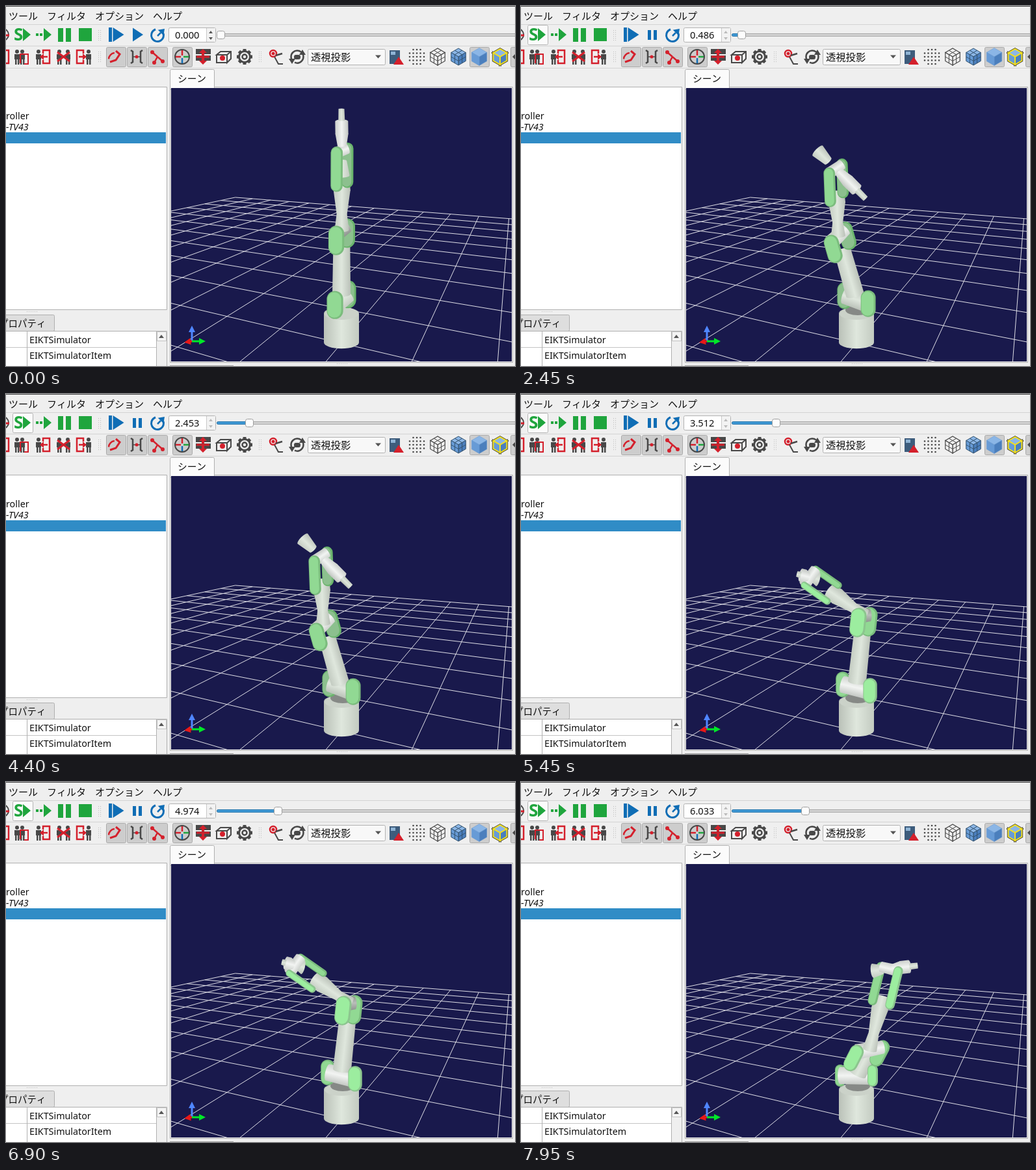
An HTML page with a canvas for the animation above (8000 ms loop, 783 by 553 pixels).

```html
<!DOCTYPE html>
<html lang="ja">
<meta charset="utf-8">
<title>Robot simulator</title>
<style>
html, body { margin: 0; width: 783px; height: 553px; overflow: hidden; background: #efefef }
canvas { display: block }
</style>
<canvas id="stage" width="783" height="553"></canvas>
<script>
const g = document.getElementById('stage').getContext('2d');
const FONT = '"Noto Sans", "Noto Sans CJK JP", sans-serif';
const RED = '#d4202c', DARK = '#484848', GREEN = '#1fa53d', BLUE = '#0f6db5', EDGE = '#b0b0b0';
const { PI, cos, sin, hypot, sqrt, max } = Math;

// ---- drawing helpers ----
function rect(c, x, y, w, h) { g.fillStyle = c; g.fillRect(x, y, w, h); }
function trace(p) {
  g.beginPath();
  for (let i = 0; i < p.length; i += 2) g.lineTo(p[i], p[i + 1]);
}
function poly(c, ...p) { trace(p); g.fillStyle = c; g.fill(); }
function line(c, w, ...p) { trace(p); g.strokeStyle = c; g.lineWidth = w; g.stroke(); }
function oval(c, x, y, rx, ry = rx) {
  g.beginPath(); g.ellipse(x, y, rx, ry, 0, 0, 7);
  g.fillStyle = c; g.fill();
}
function arc(c, w, x, y, r, a = 0, b = 2 * PI) {
  g.beginPath(); g.arc(x, y, r, a, b);
  g.strokeStyle = c; g.lineWidth = w; g.stroke();
}
function box(fill, edge, x, y, w, h, r = 2) {
  g.beginPath(); g.roundRect(x + .5, y + .5, w - 1, h - 1, r);
  g.fillStyle = fill; g.fill();
  g.strokeStyle = edge; g.lineWidth = 1; g.stroke();
}
function text(s, x, y, size = 14.5, style = '', c = '#111') {
  g.font = `${style} ${size}px ${FONT}`;
  g.fillStyle = c;
  g.fillText(s, x, y);
}
function dots(x, y, nx, ny) {
  for (let i = 0; i < nx; i++) for (let j = 0; j < ny; j++) rect('#bcbcbc', x + i * 3, y + j * 3, 1, 1);
}
// Triangle centred on (x, y); (dx, dy) reaches its tip, w is half its base.
function tri(c, x, y, dx, dy, w) {
  const k = w / hypot(dx, dy);
  poly(c, x + dx, y + dy, x - dx - dy * k, y - dy + dx * k, x - dx + dy * k, y - dy - dx * k);
}

// ---- floor grid: pinhole camera ----
const YAW = 24 * PI / 180, PITCH = 12.9 * PI / 180, DIST = 2.39, HEIGHT = 1.39, FOCAL = 585, NEAR = .1;
function toCamera(x, y) {
  const f = DIST - x * cos(YAW) - y * sin(YAW);
  return [y * cos(YAW) - x * sin(YAW), HEIGHT * cos(PITCH) - f * sin(PITCH), f * cos(PITCH) + HEIGHT * sin(PITCH)];
}
function floorLine(a, b) {
  if (a[2] < b[2]) [a, b] = [b, a];
  if (b[2] < NEAR) {
    const k = (a[2] - NEAR) / (a[2] - b[2]);
    b = a.map((v, i) => v + (b[i] - v) * k);
  }
  if (a[2] > NEAR) line('#dedee6', 1, ...[a, b].flatMap(([x, y, z]) => [516 + FOCAL * x / z, 336 + FOCAL * y / z]));
}
function grid() {
  for (let k = -5; k <= 5; k += .5) {
    floorLine(toCamera(k, -5), toCamera(k, 5));
    floorLine(toCamera(-5, k), toCamera(5, k));
  }
}

// ---- robot: joints on screen, hinges turned by angle about their link ----
const SHELL = ['#c3cbc1', '#dfe7dd', '#bac1b8'], BRIGHT = ['#ccd0cc', '#f2f4f2', '#c2c6c2'];
const GREY = ['#8c908c', '#b9bdb9', '#8a8e8a'];
const SHOULDER = [516, 451];
const poses = [
  { elbow: [516.5, 344], wrist: [517, 222], tool: [-1, -64], turn: [1.98, 1.98, 2.15], light: 0 },
  { elbow: [488, 353], wrist: [484, 250], tool: [46, 46], turn: [.76, 2.24, 2.3], light: 0 },
  { elbow: [528, 340], wrist: [444.5, 281.5], tool: [-20, -5], turn: [.57, 1.98, PI], light: 1 },
  { elbow: [536.5, 411], wrist: [567, 287], tool: [43, -5], turn: [0, 2.45, .4], light: 1 }
];
const along = (p, v, k) => [p[0] + v[0] * k, p[1] + v[1] * k];
const between = (a, b) => [b[0] - a[0], b[1] - a[1]];

function tube([x1, y1], r1, [x2, y2], r2, tone = SHELL, round = .3) {
  const n = hypot(x2 - x1, y2 - y1), r = max(r1, r2), q = PI / 2;
  g.save();
  g.translate(x1, y1);
  g.rotate(Math.atan2(y2 - y1, x2 - x1));
  const shade = g.createLinearGradient(0, -r, 0, r);
  tone.forEach((c, i) => shade.addColorStop(i / 2, c));
  g.beginPath();
  g.ellipse(n, 0, r2 * round, r2, 0, -q, q);
  g.ellipse(0, 0, r1 * round, r1, 0, q, 3 * q);
  g.closePath();
  g.fillStyle = shade;
  g.fill();
  g.restore();
}
function pad(a, b, r, light) {
  g.lineCap = 'round';
  line(`hsl(122 33% ${61 + light * 5}%)`, 2 * r, ...a, ...b);
  line(`hsl(122 ${49 + light * 20}% ${71 + light * 6}%)`, 2 * r - 4, a[0] - 1, a[1], b[0] - 1, b[1]);
  g.lineCap = 'butt';
}
// Half of a hinge axle: sideways across the link, and tipped when the link is foreshortened.
function axle(link, full, reach, turn) {
  const n = hypot(...link), tip = sqrt(max(0, 1 - (n / full) ** 2)) * sin(turn);
  return [(link[1] * cos(turn) + link[0] * tip) * reach / n, (link[1] * tip - link[0] * cos(turn)) * reach / n];
}
// Far pad, whatever sits between, near pad.
function hinge(joint, axis, span, r, light, middle) {
  const near = along(joint, axis, 1), far = along(joint, axis, -1);
  pad(far, along(far, span, 1), r, light - 1);
  middle(far, near);
  pad(near, along(near, span, 1), r, light);
}
function robot({ elbow, wrist, tool, turn, light }) {
  const arm = between(elbow, SHOULDER), forearm = between(wrist, elbow);
  const thick = (thin, extra, i) => thin + extra * sin(turn[i]);
  const onForearm = k => along(elbow, forearm, -k), onTool = k => along(wrist, tool, k);

  tube([516, 472], 27, [516, 517], 27, SHELL, .34);
  oval('#cbd2c9', 516, 473, 26, 9);
  if (turn[0] < 1) oval('#868986', 518, 467, 19, 8);
  hinge([SHOULDER[0], SHOULDER[1] - 9], [25 * cos(turn[0]), 9 * sin(turn[0])], [0, 18], thick(8, 5, 0), light, (far, near) => {
    tube(along(far, [0, 9], 1), 13, along(near, [0, 9], 1), 14, light ? BRIGHT : SHELL);
    tube(along(SHOULDER, arm, -.08), 14, along(elbow, arm, .24), 13);
  });
  hinge(elbow, axle(arm, 112, 21, turn[1]), along([0, 0], arm, 21 / hypot(...arm)), thick(8, 4.5, 1), light, (far, near) => {
    tube(far, 10, near, 12, turn[1] < 2 ? GREY : BRIGHT);
    tube(onForearm(0), 11, onForearm(.2), 8);
    tube(onForearm(.2), 8, onForearm(.5), 13);
    tube(onForearm(.5), 13, onForearm(.64), 12);
  });
  hinge(wrist, axle(forearm, 126, 15, turn[2]), along([0, 0], forearm, .42), thick(5.5, 4.5, 2), light, (far, near) => {
    tube(onTool(-.25), 7, onTool(-.6), 11);
    tube(far, 8, near, 9, BRIGHT);
    tube(onTool(.12), 7, onTool(.4), 10, BRIGHT);
    tube(onTool(.4), 10, onTool(.7), 10, BRIGHT);
    tube(onTool(.72), 5, onTool(1), 4.5, SHELL, .1);
  });
}

// ---- icons, all centred on the toolbar line ----
const MID = 78;
function person(x) {
  oval(DARK, x, MID - 8, 3);
  rect(DARK, x - 4, MID - 4, 8, 8);
  for (const dx of [-3, 1]) rect(DARK, x + dx, MID + 4, 2.5, 8);
}
function arrow(c, x, d) {
  line(c, 2.5, x, MID, x + d * 8, MID);
  tri(c, x + d * 9, MID, d * 3, 0, 5);
}
function bracket(x, d) {
  line(RED, 2.5, x, MID - 5, x, MID - 10, x + d * 10, MID - 10, x + d * 10, MID + 10, x, MID + 10, x, MID + 5);
}
const toggle = x => box('#cdcdcd', '#a9a9a9', x - 15, 63, 31, 31);
// Isometric cube: three rhombic faces of a hexagon, optionally meshed.
function cube(x, r, faces, edge, w, mesh) {
  const c = [x, MID], v = k => [x + r * sin(k * PI / 3), MID - r * cos(k * PI / 3)];
  const half = (a, b) => along(a, between(a, b), .5);
  faces.forEach((face, i) => {
    const [a, b, d] = [2 * i - 1, 2 * i, 2 * i + 1].map(v);
    poly(face, ...c, ...a, ...b, ...d);
    line(edge, w, ...c, ...a, ...b, ...d, ...c);
    if (mesh) {
      line(edge, 1, ...half(a, b), ...half(c, d));
      line(edge, 1, ...half(b, d), ...half(c, a));
    }
  });
}

function playbackBar(t, sim) {
  const running = t >= 1950, y = 44;
  arc(DARK, 2, -5, y, 9);
  line(RED, 3, 0, y + 1, 5, y + 1);
  if (t >= 700) box(t >= 1900 && !running ? '#d4d4d4' : '#fbfbfb', '#b4b4b4', 10, 29, 32, 31);
  text('S', 12, 53, 26, 'bold', GREEN);
  for (const x of [32, 64]) tri(GREEN, x, y, 6, 0, 10);
  for (const x of [46, 52]) rect(GREEN, x, y - 2, 4, 4);
  for (const x of [80, 92]) rect(GREEN, x, 34, 8, 21);
  rect(GREEN, 112, 34, 20, 20);
  dots(142, 37, 2, 6);
  rect(BLUE, 158, 33, 5, 22);
  tri(BLUE, 173, y, 8.5, 0, 11);
  if (running) for (const x of [195, 204]) rect(BLUE, x, 37, 5, 15);
  else tri(BLUE, 203, y, 8, 0, 10.5);
  arc(BLUE, 3, 233, 45, 9.5, -.5, 4.4);
  tri(BLUE, 241, 38, 3, -3, 6);
  line(BLUE, 2.5, 233, 46, 238, 41);

  box('#fff', '#b2b2b2', 250, 33, 73, 23);
  rect('#f3f3f3', 309, 34, 13, 21);
  rect('#c8c8c8', 308, 34, 1, 21);
  for (const d of [-1, 1]) tri(running ? '#bbb' : '#555', 315, 45 + d * 5, 0, d * 2, 3);
  text(sim.toFixed(3), 260, 50, 14.67);

  const knob = 330.5 + 17.74 * sim;
  box('#d2d2d2', '#a8a8a8', 324, 42, 470, 5);
  if (running) box('#3f98d4', '#2b79ae', 324, 42, knob - 322, 5);
  box('#fdfdfd', '#9d9d9d', Math.round(knob - 6.5), 38, 13, 13, 3);
}

function editBar() {
  bracket(-6, 1);
  [17, 25, 50, 82, 95, 127].forEach(person);
  line(RED, 2, 22, 88, 22, 74, 34, 74, 34, 89, 28, 89);
  bracket(57, 1);
  arrow(RED, 64, -1);
  for (const d of [-1, 1]) line(RED, 3, 79, MID - 7 * d, 98, MID + 7 * d);
  bracket(119, -1);
  arrow(RED, 112, 1);
  dots(142, 70, 2, 6);

  [169, 201, 233, 271, 728, 791].forEach(toggle);
  line(RED, 3, 160, 86, 169, 83, 175, 74, 169, 69);
  arc(RED, 2.5, 168, 82, 10, 3.2, 4.6);
  for (const d of [-1, 1]) {
    line(DARK, 2.5, 201 + 9 * d, 68, 201 + 6 * d, 70, 201 + 6 * d, 86, 201 + 9 * d, 88);
    line(RED, 2.5, 233, 78, 233 + 8 * d, 78 + 7 * d);
    oval(RED, 233 + 8 * d, 78 + 7 * d, 3);
    rect(DARK, 292, 75 + 5 * d - 4, 23, 8);
    line(RED, 4, 303, 78, 303, 78 + 9 * d);
    tri(RED, 303, 78 + 9 * d, 0, 3 * d, 6);
  }
  line(DARK, 1.5, 195, MID, 207, MID);
  oval(RED, 201, MID, 2.5);
  line(RED, 2.5, 233, 78, 228, 87);
  oval(RED, 228, 87, 3);
  arc(DARK, 2, 271, MID, 11);
  ['#1fa53d', BLUE, RED, RED].forEach((c, i) => {
    const dx = cos(i * PI / 2), dy = sin(i * PI / 2);
    line(c, 2.5, 271 + 2 * dx, MID + 2 * dy, 271 + 10 * dx, MID + 10 * dy);
  });
  line(RED, 3, 293, MID, 313, MID);
  line(DARK, 2, 340, 75, 324, 75, 330, 70, 346, 70, 346, 81, 340, 87, 340, 75, 346, 70);
  line(DARK, 2, 324, 75, 324, 87, 340, 87);
  oval(RED, 333, 80, 4);
  for (let a = 0; a < 2 * PI; a += PI / 4)
    line(DARK, 5, 367 + 8 * cos(a), MID + 8 * sin(a), 367 + 12 * cos(a), MID + 12 * sin(a));
  arc(DARK, 3, 367, MID, 8.5);
  arc(DARK, 2.5, 367, MID, 3.5);
  dots(389, 70, 2, 6);

  arc(RED, 2.5, 411, 73, 5);
  oval(RED, 411, 73, 2.5);
  line(DARK, 2.5, 415, 76, 425, 73);
  line(DARK, 2, 413, 78, 419, 89, 426, 89);
  for (const d of [-1, 1]) {
    arc(DARK, 2.5, 448, MID, 9.5, d < 0 ? 2.4 : -.8, d < 0 ? 5.4 : 2);
    tri(DARK, 448 + 8 * d, MID - 7 * d, 0, -4 * d, 5);
  }
  box(DARK, DARK, 443, 75, 10, 7);

  box('#f8f8f8', '#b2b2b2', 464, 66, 120, 25);
  text('透視投影', 469, 84, 15.3);
  tri('#555', 572.5, 78, 0, 2.5, 4.5);
  rect('#3d5c7c', 590, 68, 16, 21);
  rect('#8fb4d5', 592, 70, 7, 5);
  tri(RED, 604, 84, 0, -6, 8);
  for (let i = -2; i <= 2; i++) for (let j = -2; j <= 2; j++)
    if (Math.abs(i * j) < 4) oval(DARK, 632 + i * 5.5, MID + j * 5.5, 1.3);
  const blues = ['#8bb6e6', '#4b7fbd', '#679bd6'];
  cube(664, 13, Array(3).fill('#efefef'), DARK, 1.2, true);
  cube(696, 13, blues, '#34536f', 1, true);
  cube(728, 13.5, blues, '#6597d0', .5);
  cube(760, 12, blues, '#303030', 3.5);
  cube(760, 12, blues, '#f2df20', 2);
  tri(DARK, 781, MID, -2, 0, 4);
}

function panels() {
  rect('#fff', 0, 125, 247, 341);
  line(EDGE, 1, 0, 124.5, 247.5, 124.5, 247.5, 466.5, 0, 466.5);
  text('roller', 0, 174, 14.3);
  text('-TV43', 0, 191, 14.3, 'italic');
  rect('#308cc6', 0, 194, 246, 17);
  dots(32, 469, 6, 1);
  box('#dedede', EDGE, -5, 474, 80, 26);
  text('プロパティ', -11, 493);
  rect('#fff', 0, 500, 232, 53);
  line(EDGE, 1, 0, 499.5, 247.5, 499.5, 247.5, 553);
  line('#c4c4c4', 1, 0, 524.5, 232, 524.5);
  for (const x of [32.5, 231.5]) line(EDGE, 1, x, 500, x, 553);
  box('#f4f4f4', '#c4c4c4', 232, 500, 15, 15, 0);
  tri('#555', 239, 507.5, 0, -2.5, 4);
  ['EIKTSimulator', 'EIKTSimulatorItem'].forEach((s, i) => text(s, 36, 518 + 24 * i, 14.3));
  box('#fbfbfb', EDGE, 252, 97, 69, 32);
  text('シーン', 264, 117, 14.67);
  line(EDGE, 1, 320, 124.5, 779.5, 124.5, 779.5, 547.5, 252.5, 547.5, 252.5, 124.5);
  dots(509, 549, 6, 1);
  line('#a0a0a0', 1, 252, 552.5, 350, 552.5);
}

function scene(pose) {
  g.save();
  g.beginPath();
  g.rect(254, 126, 524, 420);
  g.clip();
  rect('#19194c', 254, 126, 524, 420);
  grid();
  robot(pose);
  for (const [c, dx, dy] of [['#4f86ff', 0, -19], ['#00e828', 16, 0], ['#e81818', -7, 1]]) {
    line(c, 3, 286, 515, 286 + dx, 515 + dy);
    const n = hypot(dx, dy);
    tri(c, 286 + dx, 515 + dy, 5 * dx / n, 5 * dy / n, 5);
  }
  g.restore();
}

function draw() {
  const t = Math.floor(performance.now() % 8000 / 50) * 50;
  const sim = max(0, 1.0085 * (t - 1968) / 1000);
  rect('#efefef', 0, 0, 783, 553);
  rect('#4a4a4a', 0, 0, 783, 1);
  let x = 4;
  for (const name of ['ツール', 'フィルタ', 'オプション', 'ヘルプ']) {
    text(name, x, 21, 15);
    x += name.length * 15 + 14;
  }
  for (const y of [28, 61, 95]) rect('#d4d4d4', 0, y, 783, 1);
  playbackBar(t, sim);
  editBar();
  panels();
  // The controller commands a new pose every 2.5 simulated seconds.
  scene(poses[t < 1950 ? 0 : 1 + Math.floor((t - 1950) / 2500)]);
  requestAnimationFrame(draw);
}
draw();
</script>
</html>
```
